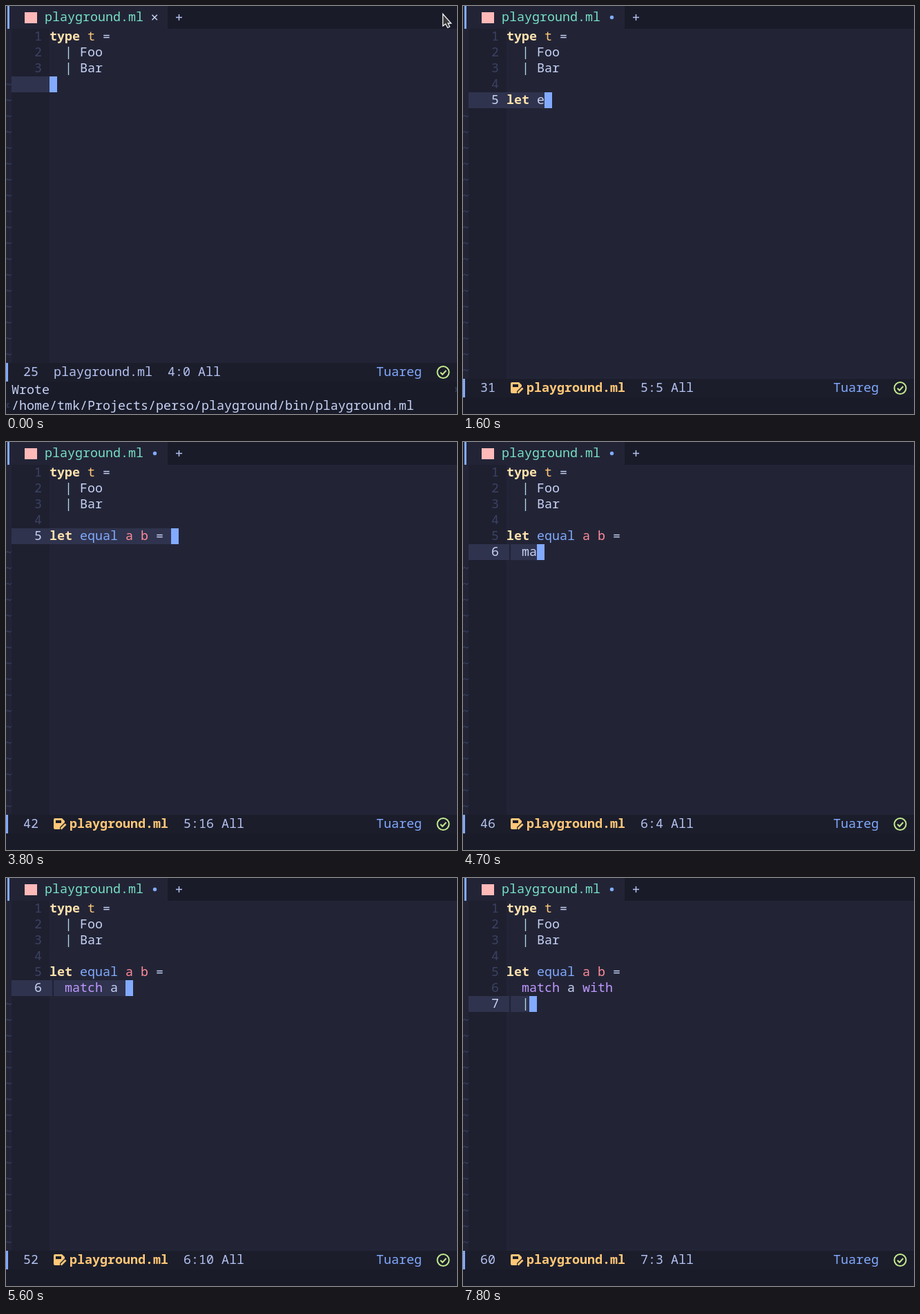
Animation of 653 by 591 pixels, one loop 8 s. Source, as an HTML page with a canvas:

```html
<!DOCTYPE html>
<html lang="en">
<head>
<meta charset="utf-8">
<title>Editor</title>
<style>
html, body { margin: 0; width: 100%; height: 100%; overflow: hidden; background: #191b29; }
canvas { display: block; }
</style>
</head>
<body>
<canvas id="stage" width="653" height="591"></canvas>
<script>
const ctx = document.getElementById("stage").getContext("2d");
const LOOP = 8000, COL = 11, ROW = 23, LEFT = 63, TOP = 33;
const FONT = '18.333px "Noto Sans Mono", "DejaVu Sans Mono", monospace';
const C = {
  bg: "#222436", gutter: "#1e2030", bar: "#1b1d2b", dark: "#191b29",
  line: "#2f334d", dim: "#3b4261", fg: "#c8d3f5", soft: "#b4c2f0",
  blue: "#82aaff", cream: "#ffe2ad", orange: "#ffc777", purple: "#c099ff",
  red: "#ff8b98", cyan: "#b4dbe4", teal: "#77e0c6", green: "#c3e88d", pink: "#ffb9b9"
};

// Keystrokes as [time in ms, inserted text]; a newline drops trailing blanks.
const keys = [
  [500, "\n"], [1100, "l"], [1300, "et"], [1400, " "], [1600, "e"],
  [1900, "q"], [2000, "u"], [2100, "a"], [2200, "l"], [2400, " "],
  [2800, "a"], [3000, " "], [3100, "b"], [3300, " "], [3400, "="], [3800, " "],
  [4000, "\n  "], [4600, "m"], [4700, "a"], [4900, "t"], [5000, "c"], [5100, "h"],
  [5300, " "], [5500, "a"], [5600, " "], [6300, "w"], [6400, "i"], [6600, "t"],
  [6800, "h"], [7100, " "], [7300, "\n  "], [7800, "|"]
];

function bufferAt(time) {
  return keys.filter(([at]) => at <= time)
    .reduce((text, [, key]) => (text + key).replace(/ +\n/g, "\n"),
      "type t =\n  | Foo\n  | Bar\n");
}

function rect(x, y, w, h, color) {
  ctx.fillStyle = color;
  ctx.fillRect(x, y, w, h);
}

function write(text, x, baseline, color, bold) {
  ctx.font = (bold ? "bold " : "") + FONT;
  ctx.fillStyle = color;
  ctx.fillText(text, x, baseline);
}

function path(data, stroke, width, fill, x = 0, y = 0) {
  const shape = new Path2D(data);
  ctx.save();
  ctx.translate(x, y);
  if (fill) { ctx.fillStyle = fill; ctx.fill(shape); }
  if (stroke) { ctx.strokeStyle = stroke; ctx.lineWidth = width; ctx.stroke(shape); }
  ctx.restore();
}

function tokenColor(word, line) {
  if (word === "type" || word === "let") return C.cream;
  if (word === "match" || word === "with") return C.purple;
  if (word === "t") return line.startsWith("type") ? C.orange : C.fg;
  if (word === "|") return C.cyan;
  if (word === "equal" && line.includes("equal a")) return C.blue;
  if (/^[ab]$/.test(word) && /^let.*=/.test(line)) return C.red;
  return C.fg;
}

function drawTabs(modified) {
  rect(0, 0, 653, TOP, C.dark);
  rect(0, 0, 234, TOP, C.bg);
  rect(2, 0, 3, TOP, C.blue);
  rect(27, 9, 18, 16, C.pink);
  write("playground.ml", 56, 22, C.teal);
  if (modified) path("M212.8 16.5a2.7 2.7 0 1 0 5.4 0a2.7 2.7 0 1 0 -5.4 0", null, 0, C.blue);
  else path("M211.5 12.8l7.4 7.4m0-7.4l-7.4 7.4", C.fg, 1.5);
  path("M246 16.5h9m-4.5-4.5v9", C.soft, 1.5);
}

function drawText(lines, bottom) {
  const last = lines.length - 1;
  rect(0, TOP, 653, bottom - TOP, C.bg);
  rect(8, TOP, LEFT - 8, bottom - TOP, C.gutter);
  lines.forEach((line, i) => {
    const y = TOP + i * ROW, current = i === last, base = y + 17;
    if (current) rect(8, y, LEFT - 8 + line.length * COL, ROW, C.line);
    if (line.startsWith("  ")) rect(67, y, 2, ROW, "#202235");
    if (!current || line) write(String(i + 1), 41, base, current ? C.fg : C.dim);
    for (const { 0: word, index } of line.matchAll(/\S+/g))
      write(word, LEFT + index * COL, base, tokenColor(word, line), /^(type|let)$/.test(word));
    if (current) rect(LEFT + line.length * COL, y, COL, ROW, C.blue);
  });
  for (let y = TOP + (lines[last] ? last + 1 : last) * ROW; y + ROW <= bottom + 1; y += ROW)
    path("M0 12.5q2-3 4-1t4-1", C.dim, 1.1, null, 0, y);
}

function drawStatus(y, size, position, modified) {
  const base = y + 19;
  rect(0, y, 653, 27, C.bar);
  rect(0, y, 3, 27, C.blue);
  write(String(size), 25, base, C.soft);
  if (modified) {
    path("M70 5.5h12l4 4v2l-7 7v3h-8q-2 0-2-2v-12q0-2 1-2zM72 8v4h8v-4z", null, 0, null, 0, y);
    ctx.save();
    ctx.translate(0, y);
    ctx.fillStyle = C.orange;
    ctx.fill(new Path2D("M71 5h10l4 4v2l-7 7v3h-7q-2 0-2-2v-12q0-2 2-2zM72 8v4h8v-4z"), "evenodd");
    ctx.restore();
    path("M79.5 20.5l7-7", C.orange, 2.8, null, 0, y);
  }
  const nameX = modified ? 92 : 69;
  write("playground.ml", nameX, base, modified ? C.orange : C.soft, modified);
  write(position + " All", nameX + 15 * COL, base, C.soft);
  write("Tuareg", 536, base, C.blue);
  path("M624.5 13.5a8.5 8.5 0 1 0 17 0a8.5 8.5 0 1 0 -17 0M629 13.7l3 3l5.3-5.7", C.green, 2, null, 0, y);
}

function drawEcho(time, top) {
  rect(0, top, 653, 591 - top, C.dark);
  if (time < 500) {
    write("Wrote", 8, 562, C.fg);
    write("/home/tmk/Projects/perso/playground/bin/playground.ml", 8, 585, C.fg);
    path("M650 553h2v5h-2M5 576h-3v5h3", C.dim, 1.2);
  } else if (time >= 6100 && time < 6900) {
    write("Syntax error in match", 8, 585, C.fg);
  }
}

function draw(time) {
  const buffer = bufferAt(time), lines = buffer.split("\n");
  const modified = time >= 500, bottom = modified ? 540 : 517;
  drawTabs(modified);
  drawText(lines, bottom);
  drawStatus(bottom, buffer.length, lines.length + ":" + lines.at(-1).length, modified);
  drawEcho(time, bottom + 27);
  if (!modified) path("M632.5 11.5v17.5l4-3l3 5.5l3-1.5l-2.5-5h4.5z", "#f4f4f4", 1.3, "#3a3a3a");
}

const start = performance.now();
function tick() {
  draw((performance.now() - start) % LOOP);
  requestAnimationFrame(tick);
}
tick();
</script>
</body>
</html>
```
